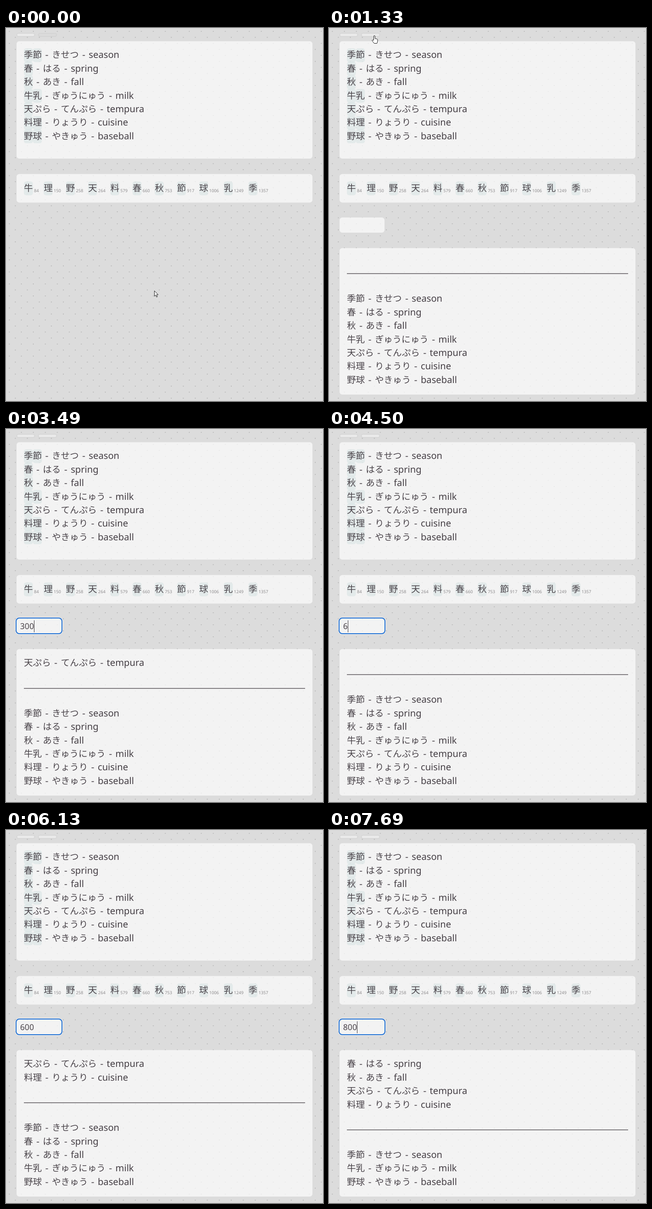
Write an HTML page that moves like this. It is 691x811 px and loops after 8 s.

```html
<!DOCTYPE html>
<html lang="ja">
<head>
<meta charset="utf-8">
<title>Kanji filter</title>
<style>
  html, body { margin: 0; width: 100%; height: 100%; overflow: hidden; background: #dcdcdc; }
  svg { display: block; }
  text {
    font: 19.6px "Noto Sans", "Noto Sans CJK JP", "Noto Sans CJK", sans-serif;
    fill: #4a444a; white-space: pre; text-rendering: geometricPrecision;
  }
  .sep { font-family: "DejaVu Sans", sans-serif; word-spacing: .055em; }
  .latin { font-size: 20.2px; fill: #453f45; }
  .rank { font-size: 9.25px; fill: #8c8a8c; }
  .panel { fill: #fff; fill-opacity: .68; }
  .chip { fill: #b4d2d0; fill-opacity: .26; }
  .button { fill: #e9e9e9; stroke: #cecece; }
  .button.off { fill: #dadada; }
  #value { font-size: 17.6px; }
  #value.selected { fill: #fff; }
</style>
</head>
<body>
<svg id="stage" width="691" height="811" viewBox="0 0 691 811">
  <defs>
    <pattern id="dots" width="26.15" height="26.15" patternUnits="userSpaceOnUse">
      <circle cx="7.3" cy="7.3" r=".8" fill="#8e8e8e"/>
      <circle cx="20.4" cy="20.4" r=".8" fill="#8e8e8e"/>
    </pattern>
  </defs>
  <rect width="691" height="811" fill="#dcdcdc"/>
  <rect width="691" height="811" fill="url(#dots)"/>

  <rect class="button" x="23.5" y="11.5" width="39" height="7" rx="3.5"/>
  <rect class="button off" id="toggle" x="70.5" y="11.5" width="40" height="7" rx="3.5"/>

  <rect class="panel" x="23" y="28.7" width="645" height="255.3" rx="6"/>
  <g id="words"></g>
  <rect class="panel" x="23" y="317.5" width="645" height="62" rx="6"/>
  <g id="ranks"></g>

  <g id="filter">
    <rect class="panel" x="23" y="412" width="98" height="33" rx="6"/>
    <g id="ring" fill="none">
      <rect x="20.5" y="409.5" width="103" height="37" rx="8" stroke="#fff" stroke-opacity=".6"/>
      <rect x="22" y="411" width="100" height="34" rx="7" stroke="#2272d4" stroke-width="2"/>
    </g>
    <rect id="selection" x="31" y="416" width="30.2" height="26" fill="#0078d7"/>
    <text id="value" x="30.8" y="434.7"></text>
    <rect id="caret" y="416" width="1" height="26" fill="#3c383c"/>
    <rect class="panel" x="23" y="478.5" width="645" height="318.5" rx="6"/>
    <rect id="rule" x="39" width="613" height="2" fill="#827e82"/>
    <g id="sorted"></g>
  </g>

  <circle id="click" r="10" fill="#f4f028" fill-opacity=".8"/>
  <g id="pointer" stroke="#222" fill="#fff">
    <path id="arrow" d="M.5.5V12.2L3.2 9.6 5.1 14 7 13.2 5.1 8.9H8.8Z"/>
    <path id="hand" transform="translate(-5 -1)" d="M4.5 10.5V2a1.4 1.4 0 0 1 2.8 0V7l4 .8q1.8.4 1.7 2.2l-.3 4-1.2 3.5H5.5L1 11.6q-.4-1.6 1.2-1.4z"/>
    <path id="beam" fill="none" d="M-3-8h2.5l.5.5.5-.5H3M0-7.5v15M-3 8h2.5l.5-.5.5.5H3"/>
  </g>
</svg>
<script>
const LOOP = 8000, EM = 19.6, LINE = 29.4, LEFT = 39;
const WORDS = [
  ["季節", "きせつ", "season"], ["春", "はる", "spring"], ["秋", "あき", "fall"],
  ["牛乳", "ぎゅうにゅう", "milk"], ["天ぷら", "てんぷら", "tempura"],
  ["料理", "りょうり", "cuisine"], ["野球", "やきゅう", "baseball"]
];
const RANKS = { 牛: 84, 理: 150, 野: 258, 天: 264, 料: 579, 春: 660, 秋: 753, 節: 917, 球: 1006, 乳: 1249, 季: 1357 };

// time, text, state of the input
const INPUT = [
  [0, "", ""], [2320, "", "caret"], [2880, "", ""],
  [3110, "3", "caret"], [3340, "30", "caret"], [3490, "300", "caret"], [3970, "300", ""],
  [4120, "300", "selected"], [4500, "6", "caret"], [4670, "60", "caret"], [4820, "600", "caret"],
  [5050, "600", ""], [5600, "600", "caret"], [6130, "600", ""],
  [6360, "600", "selected"], [6600, "8", "caret"], [6760, "80", "caret"], [6910, "800", "caret"],
  [7160, "800", ""], [7690, "800", "caret"]
];
// time, x, y of the pointer's hot spot
const TRACK = [
  [0, 323, 571], [540, 90, 55], [620, 97, 27], [740, 97, 27], [770, 98, 20], [930, 98, 18],
  [1080, 98, 17], [1400, 98, 17], [2000, 88, 374], [2240, 75, 427], [2420, 75, 427], [2560, 125, 402]
];

const $ = id => document.getElementById(id);
const show = (id, on) => $(id).style.display = on ? "" : "none";
const within = (t, from, to) => t >= from && t < to;

function add(parent, tag, attrs, text) {
  const node = document.createElementNS("http://www.w3.org/2000/svg", tag);
  for (const key in attrs) node.setAttribute(key, attrs[key]);
  if (text) node.textContent = text;
  parent.appendChild(node);
  return node;
}

function addWord(parent, [kanji, reading, meaning], y) {
  const text = add(parent, "text", { x: LEFT, y });
  add(text, "tspan", {}, kanji);
  add(text, "tspan", { class: "sep" }, " - ");
  add(text, "tspan", {}, reading);
  add(text, "tspan", { class: "sep" }, " - ");
  add(text, "tspan", { class: "latin" }, meaning);
  return text;
}

const addChip = (parent, x, baseline) =>
  add(parent, "rect", { class: "chip", x, y: baseline - 21.2, width: EM, height: 30, rx: 5 });

WORDS.forEach((word, i) => {
  const y = 65.4 + i * LINE;
  [...word[0]].forEach((char, j) => { if (RANKS[char]) addChip($("words"), LEFT + j * EM, y); });
  addWord($("words"), word, y);
});

let x = LEFT;
for (const [char, rank] of Object.entries(RANKS)) {
  addChip($("ranks"), x, 354.9);
  add($("ranks"), "text", { x, y: 354.9 }, char);
  add($("ranks"), "text", { x: x + 21.9, y: 356.6, class: "rank" }, String(rank));
  x += 32.55 + 5.29 * String(rank).length;
}

const sorted = WORDS.map(word => addWord($("sorted"), word, 0));

function sortWords(limit) {
  const known = i => [...WORDS[i][0]].every(char => !(RANKS[char] > limit));
  const all = [...WORDS.keys()];
  const top = all.filter(known);
  const order = top.concat(all.filter(i => !known(i)));
  order.forEach((word, row) =>
    sorted[word].setAttribute("y", (row < top.length ? 515.3 : 595.3) + row * LINE));
  $("rule").setAttribute("y", Math.round(533.2 + top.length * LINE));
}

function pointerAt(t) {
  const time = Math.max(0, Math.floor((t - 4) / 77) * 77 + 4);
  const next = TRACK.findIndex(key => key[0] > time);
  if (next < 0) return TRACK[TRACK.length - 1].slice(1);
  const a = TRACK[next - 1], b = TRACK[next];
  const p = (time - a[0]) / (b[0] - a[0]), ease = p * p * (3 - 2 * p);
  return [1, 2].map(i => a[i] + (b[i] - a[i]) * ease);
}

function draw(t) {
  const [, text, state] = INPUT.filter(key => key[0] <= t).pop();
  $("toggle").classList.toggle("off", t < 1330);
  show("filter", t >= 1330);
  show("ring", t >= 2320);
  show("caret", state === "caret");
  show("selection", state === "selected");
  $("value").textContent = text;
  $("value").classList.toggle("selected", state === "selected");
  $("caret").setAttribute("x", Math.round(31 + text.length * 10.05));
  sortWords(Number(text));

  const [px, py] = pointerAt(t);
  const hand = within(t, 770, 1480);
  const beam = t >= 2080 && py > 412 && px < 121;
  show("pointer", t < 3110);
  show("hand", hand);
  show("beam", beam);
  show("arrow", !hand && !beam);
  $("pointer").setAttribute("transform", `translate(${Math.round(px)} ${Math.round(py)})`);
  show("click", within(t, 1230, 1330) || within(t, 2320, 2400));
  $("click").setAttribute("transform", `translate(${px} ${py + 1})`);
}

function tick() {
  draw(performance.now() % LOOP);
  requestAnimationFrame(tick);
}
tick();
</script>
</body>
</html>
```
